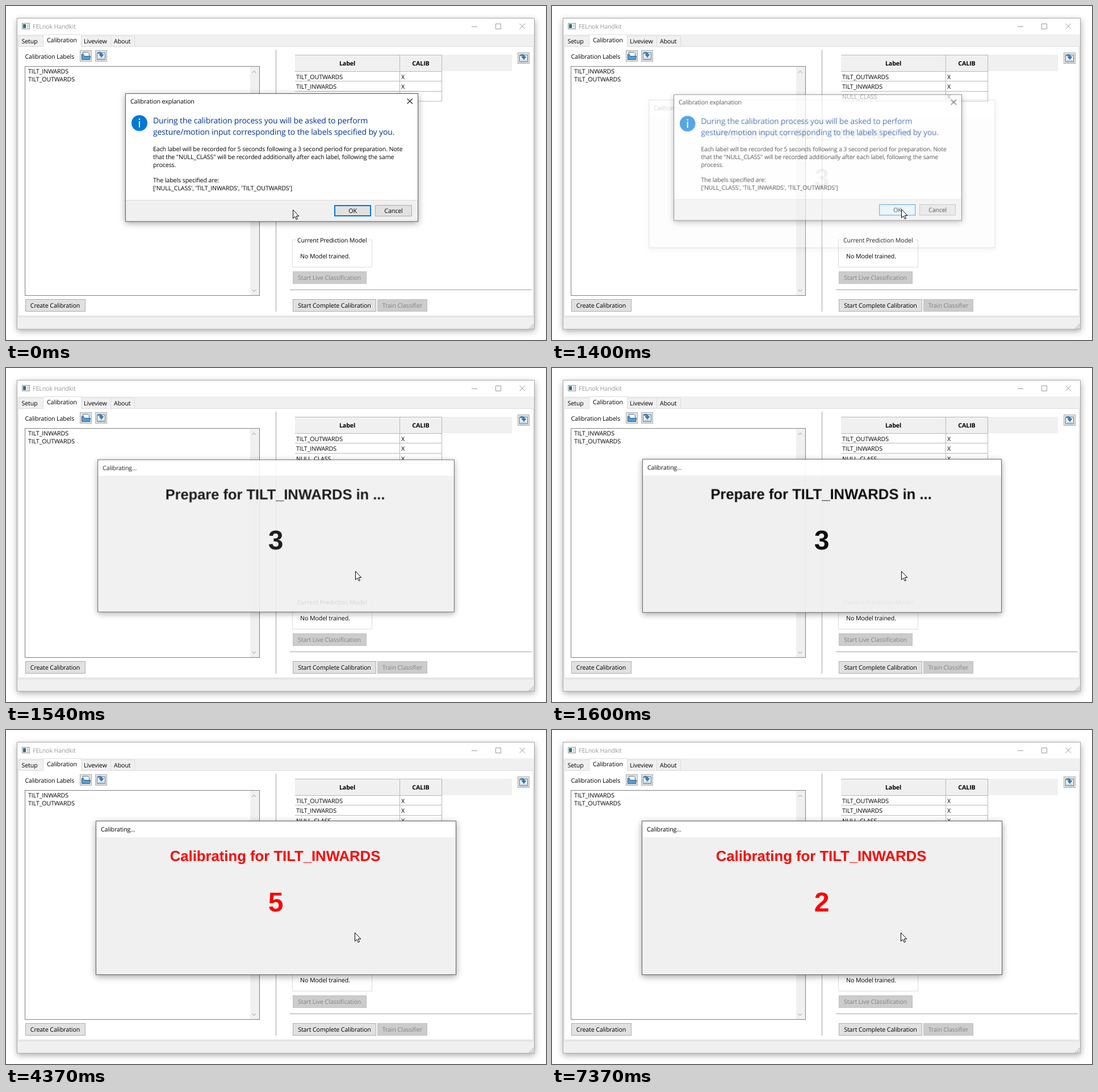
An HTML page for the animation above (8000 ms loop, 951 px wide and 589 px high).

```html
<!DOCTYPE html>
<html lang="en">
<head>
<meta charset="utf-8">
<title>Calibration</title>
<style>
html, body { margin: 0; width: 100%; height: 100%; overflow: hidden; background: #fff; }
svg { display: block; }
text {
  font: 10.7px "Open Sans", "Noto Sans", sans-serif;
  letter-spacing: -.12px;
  text-rendering: geometricPrecision;
  white-space: pre;
}
.mid { text-anchor: middle; }
.bold { font-weight: 700; }
.off { fill: #838383; }
.lead { font-size: 14px; fill: #039; }
.big { font: bold 25.7px "Liberation Sans", Arial, sans-serif; letter-spacing: 0; text-anchor: middle; }
.num { font-size: 48px; }
.red { fill: #f00; }
.gray { fill: #f0f0f0; }
.white { fill: #fff; }
.line { fill: none; stroke: #a0a0a0; }
.grid { fill: none; stroke: #b8b8b8; }
.thin { fill: none; stroke: #dcdcdc; }
.ctl { fill: none; stroke: #999; }
.btn { fill: #e1e1e1; stroke: #adadad; }
.dim { fill: #ccc; stroke: #bfbfbf; }
.shade { filter: drop-shadow(0 3px 6px rgba(0, 0, 0, .36)); }
.frame { fill: none; stroke: #5c5c5c; }

#ask, #run, #hand, #ok, #prep, #rec { animation: 8s step-end infinite; }
#ask { transform-origin: 468px 267px; animation-name: leave; }
#run { transform-origin: 475.5px 296px; animation-name: enter; }
#hand { animation-name: glide; }
#ok { animation-name: press; }
#prep { animation-name: prep; }
#rec { animation-name: rec; }
.num { visibility: hidden; animation: tick 8s step-end var(--at) infinite; }

@keyframes leave {
  0% { opacity: 1; transform: none; }
  17.125% { opacity: .86; transform: scale(.993); }
  17.5% { opacity: .66; transform: scale(.984); }
  18% { opacity: .4; transform: scale(.972); }
  18.375% { opacity: .22; transform: scale(.963); }
  18.75%, 100% { opacity: 0; transform: scale(.954); }
}
@keyframes enter {
  0% { opacity: 0; transform: scale(.95); }
  17.5% { opacity: .17; transform: scale(.961); }
  18% { opacity: .45; transform: scale(.97); }
  18.375% { opacity: .7; transform: scale(.978); }
  18.75% { opacity: .82; transform: scale(.985); }
  19.25% { opacity: .89; transform: scale(.99); }
  19.625% { opacity: .93; transform: scale(.994); }
  20% { opacity: .95; transform: scale(.997); }
  20.5%, 100% { opacity: 1; transform: none; }
}
@keyframes glide {
  0% { transform: translate(505px, 359px); }
  6.25% { transform: translate(507px, 359px); }
  6.75% { transform: translate(514px, 359px); }
  7.25% { transform: translate(525px, 359px); }
  7.75% { transform: translate(538px, 359px); }
  8.25% { transform: translate(552px, 359px); }
  8.75% { transform: translate(567px, 359px); }
  9.25% { transform: translate(582px, 358px); }
  9.75% { transform: translate(595px, 358px); }
  10.25% { transform: translate(605px, 358px); }
  10.75% { transform: translate(612px, 358px); }
  11.25% { transform: translate(615px, 358px); }
  23%, 100% { transform: translate(614px, 357px); }
}
@keyframes press {
  0% { fill: #e1e1e1; stroke: #0078d7; }
  9.25% { fill: #e5f1fb; stroke: #e5f1fb; }
  16.25% { fill: #cce4f7; stroke: #cce4f7; }
  17.125%, 100% { fill: #e5f1fb; stroke: #e5f1fb; }
}
@keyframes prep { 0% { visibility: visible; } 54.625%, 100% { visibility: hidden; } }
@keyframes rec { 0% { visibility: hidden; } 54.625%, 100% { visibility: visible; } }
@keyframes tick { 0% { visibility: visible; } 12.5%, 100% { visibility: hidden; } }
</style>
</head>
<body>
<svg width="951" height="589" viewBox="0 0 951 589">
  <defs>
    <g id="import">
      <rect class="btn" x=".5" y=".5" width="20" height="19"/>
      <path d="M3.5 4.5h14v12h-14z" fill="#eaf3fb" stroke="#5b7894"/>
      <path d="M5 13.5h11v2H5z" fill="#b9c6d2"/>
      <path d="M5 4c4-1.500 7 0 7.500 3.500H15l-4 5-4-5h2.500C9.500 6 8 5 5 6z" fill="#2f7fc0" stroke="#1c568a" stroke-width=".6"/>
    </g>
  </defs>

  <!-- main window -->
  <rect class="gray shade" x="20" y="22" width="911" height="548"/>
  <rect class="white" x="20" y="22" width="911" height="28"/>
  <rect class="white" x="22" y="71" width="906" height="475"/>
  <path class="thin" d="M22 71.500H928.500V546.500H21.500V71M20 548.500H931"/>
  <rect x="19.500" y="21.500" width="911" height="548.500" fill="none" stroke="#a8a8a8"/>
  <rect x="28.500" y="30.500" width="13" height="10" fill="#f4f6f6" stroke="#8d979a"/>
  <path d="M30 32h5v7h-5z" fill="#2f6f78"/>
  <path d="M37 32h3v7h-3z" fill="#cfd6d8"/>
  <text x="47" y="40" fill="#999">FELnok Handkit</text>
  <path class="ctl" d="M820 36.500h10M862.500 31.500h9v9h-9zM904.500 31l9.500 9.500m0-9.500l-9.500 9.500"/>
  <path d="M927 561h2v2h-2zM927 564h2v2h-2zM927 567h2v2h-2zM924 564h2v2h-2zM924 567h2v2h-2zM921 567h2v2h-2z" fill="#bdbdbd"/>

  <!-- tabs -->
  <path class="thin" d="M22.500 71V52.500H65M133 52.500H226.500V71M184.500 53V71"/>
  <path d="M65.500 72V50.500H132.500V72" fill="#fff" stroke="#dcdcdc"/>
  <text x="27.500" y="66">Setup</text>
  <text x="72" y="64">Calibration</text>
  <text x="137" y="66">Liveview</text>
  <text x="190" y="66">About</text>

  <!-- label list -->
  <text x="33.500" y="93">Calibration Labels</text>
  <rect class="btn" x="130.500" y="78.500" width="20" height="19"/>
  <path d="M135.500 81.500h9l2 2v7h-11z" fill="#f2f8fd" stroke="#4d7ea8"/>
  <path d="M133.500 93.500v-8h3l1 3h11l-1 6h-14z" fill="#5b9bd1" stroke="#2a628f"/>
  <use href="#import" x="157" y="78"/>
  <rect x="33.500" y="106.500" width="413" height="404" fill="#fff" stroke="#7f7f7f"/>
  <rect class="gray" x="430" y="107" width="16" height="403"/>
  <path class="ctl" d="M433.500 118l3.500-3.500 3.500 3.500M433.500 500l3.500 3.500 3.500-3.500"/>
  <text x="39" y="119">TILT_INWARDS</text>
  <text x="39" y="133">TILT_OUTWARDS</text>
  <rect class="btn" x="34.500" y="517.500" width="105" height="21"/>
  <text class="mid" x="86.500" y="532">Create Calibration</text>
  <path class="line" d="M475.500 77V539M500 500.500H926"/>

  <!-- table -->
  <rect class="gray" x="509" y="86" width="382" height="29"/>
  <path class="grid" d="M509 86.500H767.500V168M693.500 86V168M509 115.500H767M509 132.500H767M509 150.500H767M509 168H768"/>
  <text class="mid bold" x="601" y="105">Label</text>
  <text class="mid bold" x="730.500" y="105">CALIB</text>
  <text x="511" y="129">TILT_OUTWARDS</text>
  <text x="511" y="146">TILT_INWARDS</text>
  <text x="511" y="164">NULL_CLASS</text>
  <text x="696" y="129">X</text>
  <text x="696" y="146">X</text>
  <text x="696" y="164">X</text>
  <use href="#import" x="901" y="82"/>

  <!-- model -->
  <path class="thin" d="M510 412.500H504.500V460.500H644.500V412.500H639"/>
  <text x="513" y="417">Current Prediction Model</text>
  <text x="518" y="445">No Model trained.</text>
  <rect class="dim" x="505.500" y="468.500" width="129" height="21"/>
  <text class="mid off" x="569.500" y="483">Start Live Classification</text>
  <rect class="btn" x="505.500" y="517.500" width="146" height="21"/>
  <text class="mid" x="578.500" y="532">Start Complete Calibration</text>
  <rect class="dim" x="654.500" y="517.500" width="87" height="21"/>
  <text class="mid off" x="698" y="532">Train Classifier</text>

  <!-- countdown dialog -->
  <g id="run">
    <rect class="gray shade" x="158" y="160" width="635" height="272"/>
    <rect class="white" x="159" y="161" width="633" height="28"/>
    <rect class="frame" x="158.500" y="160.500" width="634" height="271"/>
    <text x="167" y="179">Calibrating...</text>
    <text class="big" id="prep" x="474" y="231">Prepare for TILT_INWARDS in ...</text>
    <text class="big red" id="rec" x="474" y="231">Calibrating for TILT_INWARDS</text>
    <text class="big num" x="475" y="320" style="--at:1.37s">3</text>
    <text class="big num" x="475" y="320" style="--at:2.37s">2</text>
    <text class="big num" x="475" y="320" style="--at:3.37s">1</text>
    <text class="big num red" x="475" y="320" style="--at:4.37s">5</text>
    <text class="big num red" x="475" y="320" style="--at:5.37s">4</text>
    <text class="big num red" x="475" y="320" style="--at:6.37s">3</text>
    <text class="big num red" x="475" y="320" style="--at:7.37s">2</text>
  </g>

  <!-- explanation dialog -->
  <g id="ask">
    <rect class="white shade" x="210" y="154" width="516" height="226"/>
    <rect class="gray" x="211" y="343" width="514" height="37"/>
    <path class="thin" d="M211 342.500H725"/>
    <rect class="frame" x="210.500" y="154.500" width="515" height="225.500"/>
    <text x="219" y="172">Calibration explanation</text>
    <path d="M706.500 163.500l9.500 9m0-9l-9.500 9" fill="none" stroke="#222" stroke-width="1.100"/>
    <circle cx="235" cy="206.500" r="14" fill="#0078d7"/>
    <path class="white" d="M234 203h2v11h-2zM233.800 198.500h2.400v2.400h-2.400z"/>
    <text class="lead" x="259" y="207">During the calibration process you will be asked to perform</text>
    <text class="lead" x="259" y="227">gesture/motion input corresponding to the labels specified by you.</text>
    <text x="259" y="256">Each label will be recorded for 5 seconds following a 3 second period for preparation. Note</text>
    <text x="259" y="270">that the "NULL_CLASS" will be recorded additionally after each label, following the same</text>
    <text x="259" y="284">process.</text>
    <text x="259" y="311">The labels specified are:</text>
    <text x="259" y="325">['NULL_CLASS', 'TILT_INWARDS', 'TILT_OUTWARDS']</text>
    <rect x="578.500" y="351.500" width="64" height="19" fill="none" stroke="#0078d7"/>
    <rect id="ok" x="579.500" y="352.500" width="62" height="17"/>
    <text class="mid" x="610.500" y="365">OK</text>
    <rect class="btn" x="650.500" y="351.500" width="64" height="19"/>
    <text class="mid" x="682.500" y="365">Cancel</text>
  </g>

  <path id="hand" d="M.5 .5V15.500L3.900 12.300 6.300 17.500 8.500 16.500 6.200 11.500H10.800Z" fill="#fff" stroke="#000"/>
</svg>
</body>
</html>
```
